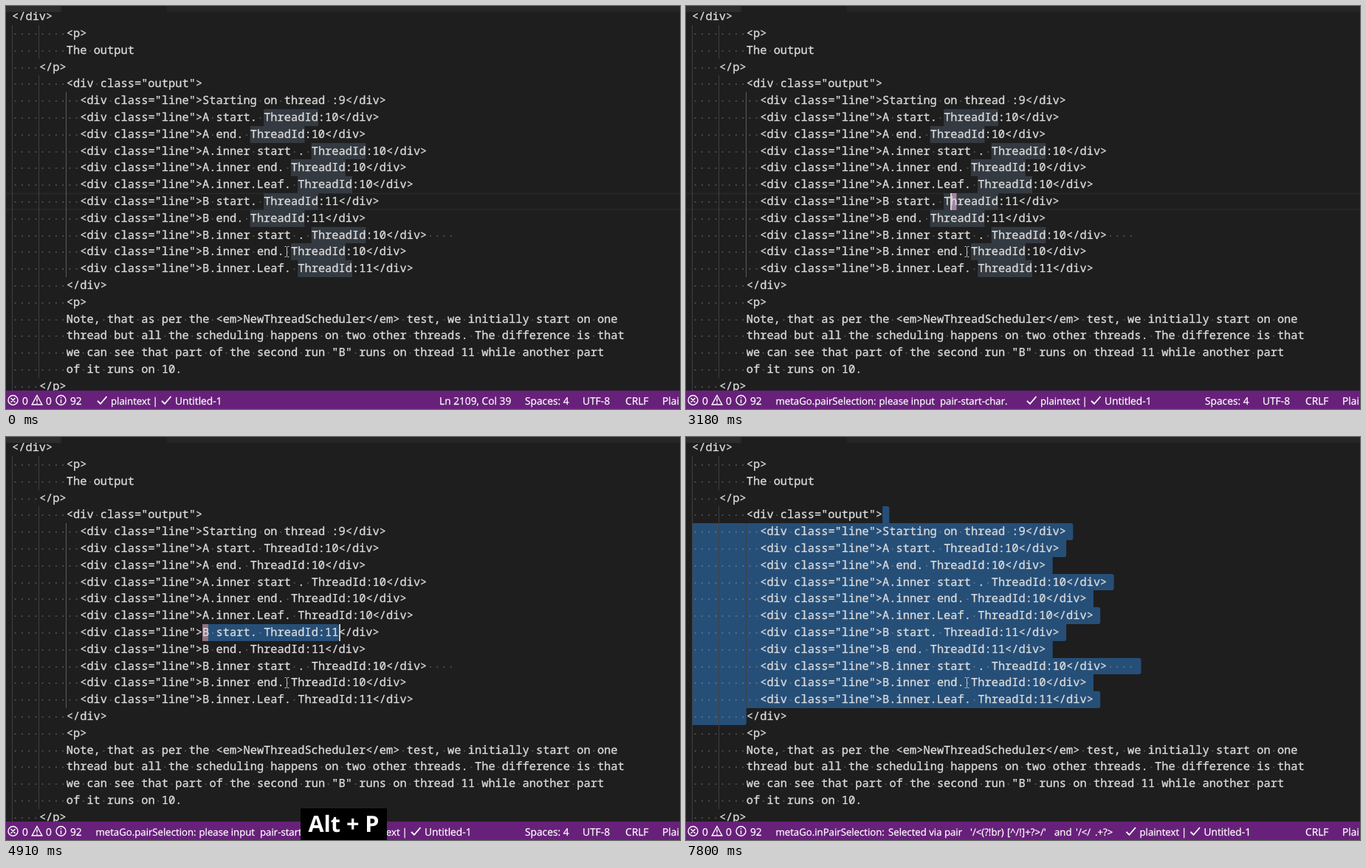
Write an HTML page that moves like this. It is 913 px wide and 547 px high and loops after 8 s.

```html
<!DOCTYPE html>
<html lang="en">
<head>
<meta charset="utf-8">
<title>Pair selection</title>
<style>
  html, body { margin: 0; width: 100%; height: 100%; overflow: hidden; background: #1e1e1e; }
  svg { display: block; }
  text { text-rendering: geometricPrecision; }
  .code text { font: 15.37px "Noto Sans Mono", monospace; fill: #dcdcdc; stroke: #dcdcdc; stroke-width: .3; }
  .bar text { font: 13.75px "Open Sans", sans-serif; fill: #fff; stroke: #fff; stroke-width: .25; }
  .bar .msg text { font-size: 13.2px; }
  .icon { fill: none; stroke: #fff; stroke-width: 1.4; }
  .key text { font: 700 30.5px "Open Sans", sans-serif; fill: #fff; text-anchor: middle; }
  .sel { fill: #264f78; }
  .caret { fill: #d0cccb; }
  .guide { fill: #404040; }
  .active { fill: #5c5c5c; }
  .dots { fill: rgba(227, 228, 226, .27); }
</style>
</head>
<body>
<svg width="913" height="547" viewBox="0 0 913 547">
  <rect width="913" height="547" fill="#1e1e1e"/>
  <g class="code">
    <g data-on="0-3580" id="words">
      <path d="M0 254.5H913M0 276H913" stroke="#2a2a2a" stroke-width="1.6"/>
    </g>
    <g data-on="3580-6310" id="line"></g>
    <g data-on="6310-8000" id="block"></g>
    <g id="marks"></g>
    <g id="guides"></g>
    <g id="text"></g>
    <g id="carets"></g>
    <path d="M377.5 326.5h2l1 1 1-1h2M380.5 327v13M377.5 340.5h2l1-1 1 1h2" fill="none" stroke="#c4c4c4"/>
  </g>
  <rect width="913" height="8" fill="#252526"/>
  <rect width="74" height="8" fill="#2d2d2d"/>
  <rect x="75" width="143" height="8" fill="#1e1e1e"/>

  <g class="bar">
    <rect y="522" width="913" height="25" fill="#68217a"/>
    <g class="icon">
      <circle cx="9.5" cy="535" r="6.5"/>
      <path d="M6.5 532l6 6m0-6l-6 6M42 528.5l6.8 12.5h-13.6zM42 532.5v4.500m0 1.200v1.500"/>
      <circle cx="74.5" cy="535" r="6.5"/>
      <path d="M74.5 531v1.6m0 1.400v5"/>
    </g>
    <text x="22" y="541">0</text>
    <text x="54" y="541">0</text>
    <text x="87" y="541">92</text>
    <g id="files">
      <path class="icon" style="stroke-width:1.8" d="M124 536l4 4 8.5-10M211 536l4 4 8.5-10"/>
      <g class="msg">
        <text x="142" y="541">plaintext</text>
        <text x="198.500" y="541">|</text>
      </g>
      <text x="229" y="541">Untitled-1</text>
    </g>
    <g class="msg" data-on="1930-3580 4910-6310">
      <text x="121.500" y="541">metaGo.pairSelection:</text>
      <text x="261.500" y="541">please input</text>
      <text x="344" y="541">pair-start-char.</text>
    </g>
    <g class="msg" data-on="3580-4910 6310-8000">
      <text x="121.500" y="541">metaGo.inPairSelection:</text>
      <text x="274" y="541">Selected via pair</text>
      <text x="385" y="541">'/&lt;(?!br)</text>
      <text x="435" y="541">[^/!]+?&gt;/'</text>
      <text x="499" y="541">and</text>
      <text x="528" y="541">'/&lt;/</text>
      <text x="554" y="541">.+?&gt;</text>
    </g>
    <text data-on="0-1930" x="587" y="541">Ln 2109, Col 39</text>
    <g data-on="0-3580 4910-6310">
      <text x="703" y="541">Spaces: 4</text>
      <text x="781" y="541">UTF-8</text>
    </g>
    <text x="839" y="541">CRLF</text>
    <text x="889" y="541">Plain Text</text>
  </g>

  <g class="key" data-on="1930-2880 4910-5850">
    <rect x="399" y="504" width="117" height="43"/>
    <text x="457.500" y="536">Alt + P</text>
  </g>
  <g class="key" data-on="3580-4590 6230-7180">
    <rect x="442" y="506" width="30" height="41"/>
    <text x="457.500" y="536">t</text>
  </g>
</svg>
<script>
const LOOP = 8000, LEFT = 8, CHAR = 9.22, ROW = 22.8;
const $ = id => document.getElementById(id);
const colX = col => LEFT + col * CHAR;
const rowY = row => Math.round(3.2 + row * ROW);

const out = text => ' '.repeat(10) + `<div class="line">${text}</div>`;
const body = text => ' '.repeat(8) + text;
const lines = [
  '</div>',
  body('<p>'),
  body('The output'),
  '    </p>',
  body('<div class="output">'),
  out('Starting on thread :9'),
  out('A start. ThreadId:10'),
  out('A end. ThreadId:10'),
  out('A.inner start . ThreadId:10'),
  out('A.inner end. ThreadId:10'),
  out('A.inner.Leaf. ThreadId:10'),
  out('B start. ThreadId:11'),
  out('B end. ThreadId:11'),
  out('B.inner start . ThreadId:10') + '    ',
  out('B.inner end. ThreadId:10'),
  out('B.inner.Leaf. ThreadId:11'),
  body('</div>'),
  body('<p>'),
  body('Note, that as per the <em>NewThreadScheduler</em> test, we initially start on one'),
  body('thread but all the scheduling happens on two other threads. The difference is that'),
  body('we can see that part of the second run "B" runs on thread 11 while another part'),
  body('of it runs on 10.'),
  '    </p>'
];

function add(parent, tag, attrs, text) {
  const el = document.createElementNS('http://www.w3.org/2000/svg', tag);
  for (const k in attrs) el.setAttribute(k, attrs[k]);
  if (text) el.textContent = text;
  return $(parent).appendChild(el);
}

function box(parent, row, x, width, attrs) {
  const y = rowY(row);
  return add(parent, 'rect', { x, y, width, height: rowY(row + 1) - y, ...attrs });
}

// Words and space dots sit on the character grid.
let dots = '';
lines.forEach((line, row) => {
  const y = rowY(row);
  for (const m of line.matchAll(/\S+/g))
    add('text', 'text', { x: colX(m.index), y: y + 16 }, m[0]);
  for (const m of line.matchAll(/ /g))
    dots += `M${colX(m.index + .5) - .9} ${y + 11.2}h1.8v1.8h-1.8z`;

  const indent = line.search(/\S/);
  for (let col = 0; col < indent; col += 4) {
    const x = Math.floor(colX(col));
    box('guides', row, x, 1, { class: 'guide' });
    if (col === 8) box('guides', row, x, 1, { class: 'active', 'data-on': '0-6310' });
  }
  const word = line.indexOf('ThreadId');
  if (word > 0) box('words', row, colX(word), 8 * CHAR, { fill: '#343a41' });
});
add('text', 'path', { d: dots, class: 'dots' });

// Multi-line selection, rounded wherever the right edge steps outwards.
const last = 16;
const selEnd = row => row < 4 ? 0 : row < last ? lines[row].length + 1 : row === last ? 8 : 0;
for (let row = 4; row <= last; row++) {
  const x = row === 4 ? colX(28) : LEFT, end = colX(selEnd(row));
  const y = rowY(row), bottom = rowY(row + 1);
  const a = selEnd(row) > selEnd(row - 1) ? 3 : 0;
  const b = selEnd(row) > selEnd(row + 1) ? 3 : 0;
  add('block', 'path', {
    class: 'sel',
    d: `M${x} ${y}H${end - a}q${a} 0 ${a} ${a}V${bottom - b}q0 ${b} ${-b} ${b}H${x}z`
  });
}
box('line', 11, colX(28), 20 * CHAR, { class: 'sel', rx: 3 });

box('marks', 11, 358, 8.5, { fill: '#a483a2', 'data-on': '1930-3580' });
box('marks', 11, 266, 8, { fill: '#8e7184', 'data-on': '4910-6310' });

const caret = (row, x, on) => box('carets', row, x, 2, { class: 'caret', 'data-on': on });
caret(11, 358, '230-710 1170-1700 2180-2710 3180-3580');
caret(11, 451, '3580-4040 4510-5060 5530-6080');
caret(16, 81, '6310-6780 7250-7800');

const parts = [...document.querySelectorAll('[data-on]')].map(el => ({
  el, spans: el.dataset.on.split(' ').map(s => s.split('-').map(Number))
}));
const within = (t, spans) => spans.some(([a, b]) => t >= a && t < b);
const asking = [[1930, 3580], [4910, 6310]];
const start = performance.now();

function draw() {
  const t = (performance.now() - start) % LOOP;
  for (const { el, spans } of parts)
    el.style.display = within(t, spans) ? '' : 'none';
  const shift = t < 1930 ? 0 : within(t, asking) ? 338 : 472.5;
  $('files').setAttribute('transform', `translate(${shift})`);
  requestAnimationFrame(draw);
}
draw();
</script>
</body>
</html>
```
